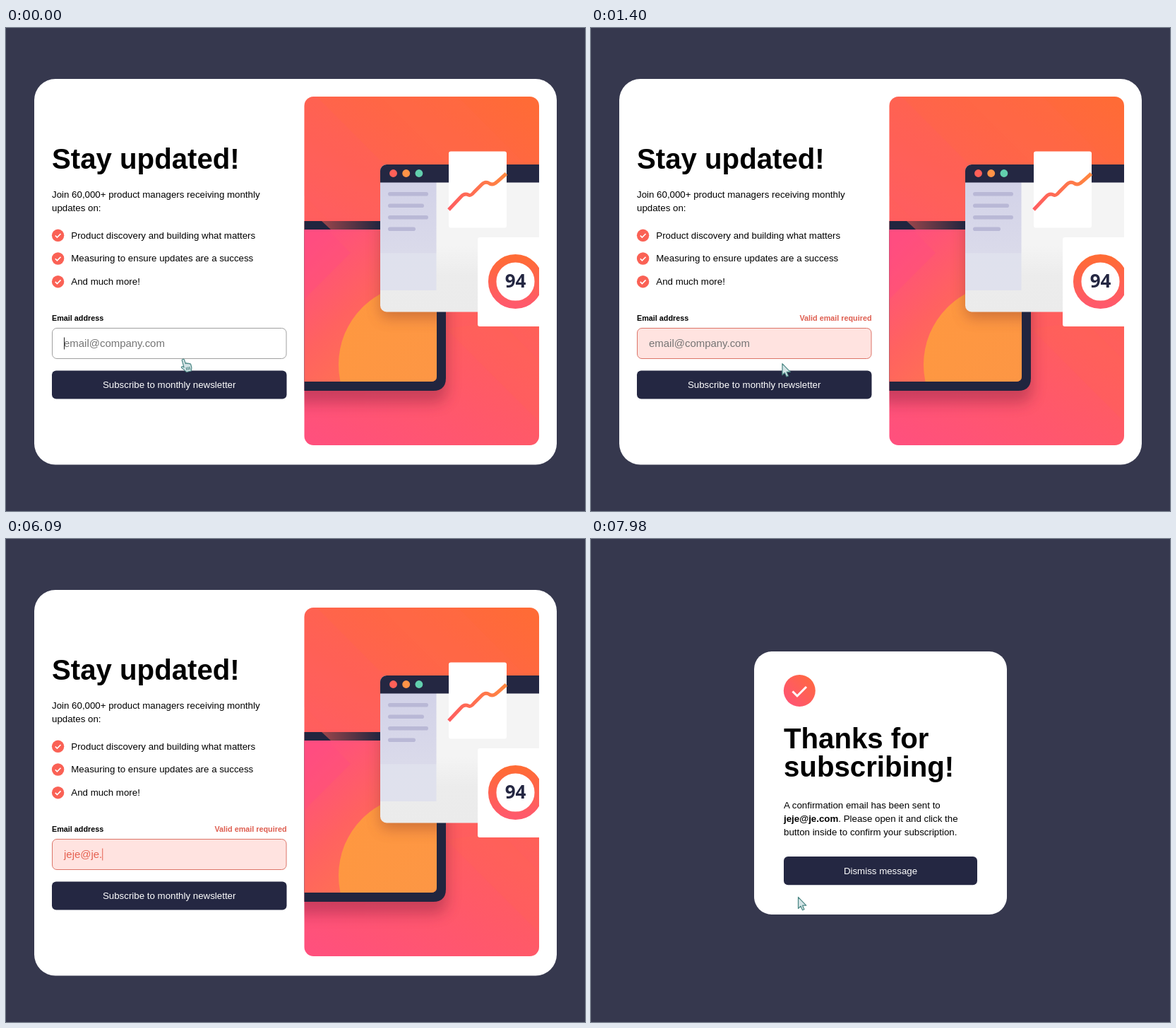
Animation of 820 by 683 pixels, one loop 8000 ms. Source, as an HTML page:

```html
<!DOCTYPE html>
<html lang="en">
<head>
<meta charset="utf-8">
<title>Newsletter sign-up</title>
<style>
  html, body { margin: 0; width: 100%; height: 100%; overflow: hidden; background: #36384e; }
  svg { display: block; width: 100vw; height: 100vh; }
  text { font-family: "Liberation Sans", Arial, Helvetica, sans-serif; font-size: 13.3px; white-space: pre; }
  .title { font-size: 40.2px; font-weight: 700; }
  .label { font-size: 10.8px; font-weight: 700; }
  .field { font-size: 14.96px; }
  .button { fill: #fff; text-anchor: middle; }
  .score { font: 700 26px "Open Sans", "Noto Sans", sans-serif; fill: #242742; text-anchor: middle; }
  .cursor path { fill: #d3e4e6; stroke: #4b8784; stroke-width: 1.2; stroke-linejoin: round; stroke-linecap: round; }
</style>
</head>
<body>
<svg viewBox="0 0 820 683">
  <defs>
    <linearGradient id="panel" gradientUnits="userSpaceOnUse" x1="430" y1="580" x2="745" y2="107">
      <stop stop-color="#ff507d"/><stop offset=".5" stop-color="#ff5f5b"/><stop offset="1" stop-color="#ff6b36"/>
    </linearGradient>
    <linearGradient id="screen" gradientUnits="userSpaceOnUse" x1="425" y1="310" x2="590" y2="480">
      <stop stop-color="#ff4e80"/><stop offset=".45" stop-color="#ff6260"/><stop offset="1" stop-color="#ff7c4a"/>
    </linearGradient>
    <linearGradient id="sun" x1="0" y1="0" x2="1" y2="1">
      <stop stop-color="#ff983f"/><stop offset="1" stop-color="#fb9548"/>
    </linearGradient>
    <linearGradient id="glare" x1="0" x2="1">
      <stop stop-color="#ff6155" stop-opacity=".55"/><stop offset="1" stop-color="#ff6155" stop-opacity="0"/>
    </linearGradient>
    <linearGradient id="sidebar" x2="0" y2="1">
      <stop stop-color="#d2d2e8"/><stop offset=".65" stop-color="#dadaea"/><stop offset=".66" stop-color="#dfe1ed"/><stop offset="1" stop-color="#e0e1ed"/>
    </linearGradient>
    <linearGradient id="content" x2="0" y2="1">
      <stop offset=".55" stop-color="#f4f4f4"/><stop offset=".75" stop-color="#ececec"/><stop offset="1" stop-color="#ebebeb"/>
    </linearGradient>
    <linearGradient id="ring" x2="0" y2="1">
      <stop stop-color="#ff6b36"/><stop offset="1" stop-color="#ff596b"/>
    </linearGradient>
    <linearGradient id="trend"><stop stop-color="#ff5d60"/><stop offset="1" stop-color="#ff873f"/></linearGradient>
    <linearGradient id="hot"><stop stop-color="#ff527b"/><stop offset="1" stop-color="#ff6a3a"/></linearGradient>
    <linearGradient id="badge" x1="0" y1="1" x2="1" y2="0"><stop stop-color="#ff527b"/><stop offset="1" stop-color="#ff6a3a"/></linearGradient>
    <filter id="soft" x="-20%" y="-40%" width="140%" height="190%"><feGaussianBlur stdDeviation="4"/></filter>
    <filter id="wide" x="-20%" y="-20%" width="140%" height="140%"><feGaussianBlur stdDeviation="10"/></filter>
    <clipPath id="panelClip"><rect x="422.5" y="97" width="332.5" height="493" rx="13"/></clipPath>
    <clipPath id="screenClip"><path d="M422 285H610V492Q610 500 602 500H422Z"/></clipPath>
    <clipPath id="windowClip"><rect x="530" y="193" width="260" height="208.500" rx="9"/></clipPath>
  </defs>
  <rect width="820" height="683" fill="#36384e"/>

  <g id="signup">
    <rect x="40" y="72" width="740" height="545.500" rx="30" fill="#fff"/>
    <text class="title" x="65" y="199">Stay updated!</text>
    <text x="65" y="240">Join 60,000+ product managers receiving monthly</text>
    <text x="65" y="259">updates on:</text>
    <g id="benefits"></g>
    <text class="label" x="65" y="414">Email address</text>
    <text class="label" id="error" x="397.500" y="414" text-anchor="end" fill="#de5e50">Valid email required</text>
    <rect id="input" x="65.500" y="424.500" width="331.500" height="43" rx="6.500"/>
    <text class="field" id="email" x="82" y="451"></text>
    <rect id="caret" y="437.500" width="1" height="17"/>
    <rect id="glow" x="67" y="500" width="328" height="30" rx="6" fill="#ff6155" opacity=".5" filter="url(#soft)"/>
    <rect id="submit" x="65" y="484.500" width="332.500" height="40" rx="6"/>
    <text class="button" x="231.200" y="509">Subscribe to monthly newsletter</text>

    <g clip-path="url(#panelClip)">
      <rect x="422" y="97" width="334" height="494" fill="url(#panel)"/>
      <path d="M422 97H440L560 217V273H458L422 237Z" fill="#ff5a6c" opacity=".18"/>
      <path d="M530 97H640L740 197H630Z" fill="#ff6b4a" opacity=".2"/>
      <path d="M623 425L755 557V470L700 415Z" fill="#ff6450" opacity=".25"/>
      <rect x="400" y="290" width="225" height="240" rx="18" fill="#7d1d3c" opacity=".4" filter="url(#wide)"/>
      <path d="M422 273H623V495Q623 513 605 513H422Z" fill="#21253f"/>
      <g clip-path="url(#screenClip)">
        <rect x="422" y="285" width="190" height="216" fill="url(#screen)"/>
        <path d="M422 285H455L488 318L422 384Z" fill="#ff4c80" opacity=".4"/>
        <circle cx="585" cy="476" r="114" fill="url(#sun)"/>
        <rect x="530" y="210" width="230" height="200" rx="9" fill="#8a3a2c" opacity=".4" filter="url(#wide)"/>
      </g>
      <path d="M447 273H530V285H460Z" fill="url(#glare)"/>
      <g clip-path="url(#windowClip)">
        <rect x="530" y="193" width="226" height="209" fill="url(#content)"/>
        <rect x="530" y="218" width="79.500" height="153" fill="url(#sidebar)"/>
        <rect x="530" y="193" width="226" height="25.500" fill="#242742"/>
      </g>
      <g id="window"></g>
      <rect x="627" y="174.500" width="82" height="108" rx="3" fill="#fff"/>
      <path d="M627 257L644 239Q649 233 655 236Q658 238 663 232L674 221Q679 216 685 220Q690 223 696 217L708.500 206" fill="none" stroke="url(#trend)" stroke-width="5"/>
      <rect x="668" y="296" width="100" height="126" rx="3" fill="#fff"/>
      <circle cx="721.500" cy="358.500" r="32.800" fill="none" stroke="url(#ring)" stroke-width="11.500"/>
      <text class="score" x="721.500" y="367">94</text>
    </g>
  </g>

  <g id="thanks">
    <rect x="231" y="159" width="358" height="372" rx="25" fill="#fff"/>
    <circle cx="295.300" cy="214.500" r="22.500" fill="url(#badge)"/>
    <path d="M285.500 215.500L292 222L305 209" fill="none" stroke="#fff" stroke-width="3"/>
    <text class="title" x="273" y="296">Thanks for</text>
    <text class="title" x="273" y="336">subscribing!</text>
    <text x="273" y="381">A confirmation email has been sent to</text>
    <text x="273" y="400"><tspan font-weight="700">jeje@je.com</tspan>. Please open it and click the</text>
    <text x="273" y="419">button inside to confirm your subscription.</text>
    <rect x="273" y="449" width="274" height="40.300" rx="6" fill="#242742"/>
    <text class="button" x="410" y="473.500">Dismiss message</text>
  </g>

  <g class="cursor" id="hand">
    <path d="M1.200 1.600C2-.2 4-.2 4.600 1.400L6.300 6.600C7 5.600 8.400 5.700 8.800 6.700 9.700 5.800 11 6 11.400 7 12.400 6.400 13.500 6.800 13.800 8L14.800 12C15 14 14.300 15 14.200 17L7.500 18.500C6 16.500 3 14.500 .8 12.600-.2 11.200 1.400 10 2.800 11L4 11.800Z"/>
    <path d="M7.300 12.300l.8 3.400M9.500 11.800l.8 3.400M11.700 11.300l.8 3.400"/>
  </g>
  <g class="cursor" id="arrow"><path d="M.5 .5V16.500L4 13.200L6.500 18.800L9 17.700L6.600 12.200H11.800Z"/></g>
  <g class="cursor" id="beam"><path d="M-3-8.500Q0-8.500 0-6V6Q0 8.500-3 8.500M3-8.500Q0-8.500 0-6M0 6Q0 8.500 3 8.500" style="fill:none"/></g>
</svg>
<script>
const LOOP = 8000;
const el = id => document.getElementById(id);
const show = (id, on) => el(id).setAttribute('visibility', on ? 'visible' : 'hidden');
const set = (id, attrs) => Object.entries(attrs).forEach(([k, v]) => el(id).setAttribute(k, v));

el('benefits').innerHTML = [
  'Product discovery and building what matters',
  'Measuring to ensure updates are a success',
  'And much more!'
].map((text, i) => `<g transform="translate(0 ${i * 32.7})">
  <circle cx="73.600" cy="293.300" r="8.700" fill="#fa6155"/>
  <path d="M69.800 293.500L72.400 296.100L77.500 291" fill="none" stroke="#fff" stroke-width="1.600"/>
  <text x="92.300" y="297.500">${text}</text></g>`).join('');

el('window').innerHTML =
  ['#ff6058', '#ff9347', '#62cfae'].map((fill, i) =>
    `<circle cx="${548.5 + i * 18.2}" cy="205.500" r="5.400" fill="${fill}"/>`).join('') +
  [57, 51, 57, 39].map((width, i) =>
    `<rect x="541" y="${232 + i * 16.5}" width="${width}" height="5.600" rx="2.800" fill="#b9b8d6"/>`).join('');

const typing = [
  [0, ''], [2660, 'je'], [2800, 'jej'], [3500, 'jeje'], [4270, 'jeje@'], [4620, 'jeje@ej'],
  [5460, 'jeje@'], [5880, 'jeje@j'], [5950, 'jeje@je'], [6090, 'jeje@je.'],
  [6230, 'jeje@je.c'], [6370, 'jeje@je.co'], [6580, 'jeje@je.com']
];
const caretOn = [
  [0, 490], [1750, 2240], [2660, 3290], [3500, 4060], [4270, 5110], [5600, 7070], [7560, 7770]
];
// Each stop: time, x, y
const route = [
  [0, 248, 468], [70, 248, 468], [630, 245, 497], [1190, 245, 497],
  [1540, 284, 462], [7210, 284, 462], [7630, 293, 506], [LOOP, 293, 506]
];

function cursorAt(t) {
  const i = route.findIndex(stop => stop[0] > t);
  const [t0, x0, y0] = route[i - 1], [t1, x1, y1] = route[i];
  const p = (t - t0) / (t1 - t0), e = p * p * (3 - 2 * p);
  return [x0 + (x1 - x0) * e, y0 + (y1 - y0) * e];
}

function cursorKind(t, y) {
  if (t >= 2520 && t < 7210) return '';
  if (t >= 7980) return 'arrow';
  if (t < 1190 || y >= 485) return 'hand';
  return y > 467.5 ? 'arrow' : 'beam';
}

function render(t) {
  const invalid = t >= 910, done = t >= 7910;
  const [x, y] = cursorAt(t);
  const hover = y >= 485, kind = cursorKind(t, y);
  const value = typing.filter(([time]) => time <= t).pop()[1];

  el('signup').style.display = done ? 'none' : '';
  el('thanks').style.display = done ? '' : 'none';
  show('error', invalid);
  show('glow', hover);
  set('input', { fill: invalid ? '#ffe3e0' : '#fff', stroke: invalid ? '#dc7468' : '#a0a0a0' });
  set('submit', { fill: hover ? 'url(#hot)' : '#242742' });

  el('email').textContent = value || 'email@company.com';
  set('email', { fill: value ? '#e5604f' : '#757575' });
  show('caret', caretOn.some(([from, to]) => t >= from && t < to));
  set('caret', {
    x: 82 + (value && !done ? el('email').getComputedTextLength() : 0),
    fill: invalid ? '#e5604f' : '#222'
  });

  for (const id of ['hand', 'arrow', 'beam']) {
    show(id, id === kind);
    set(id, { transform: `translate(${x} ${y})` });
  }
}

const start = performance.now();
function tick() {
  render((performance.now() - start) % LOOP);
  requestAnimationFrame(tick);
}
tick();
</script>
</body>
</html>
```
